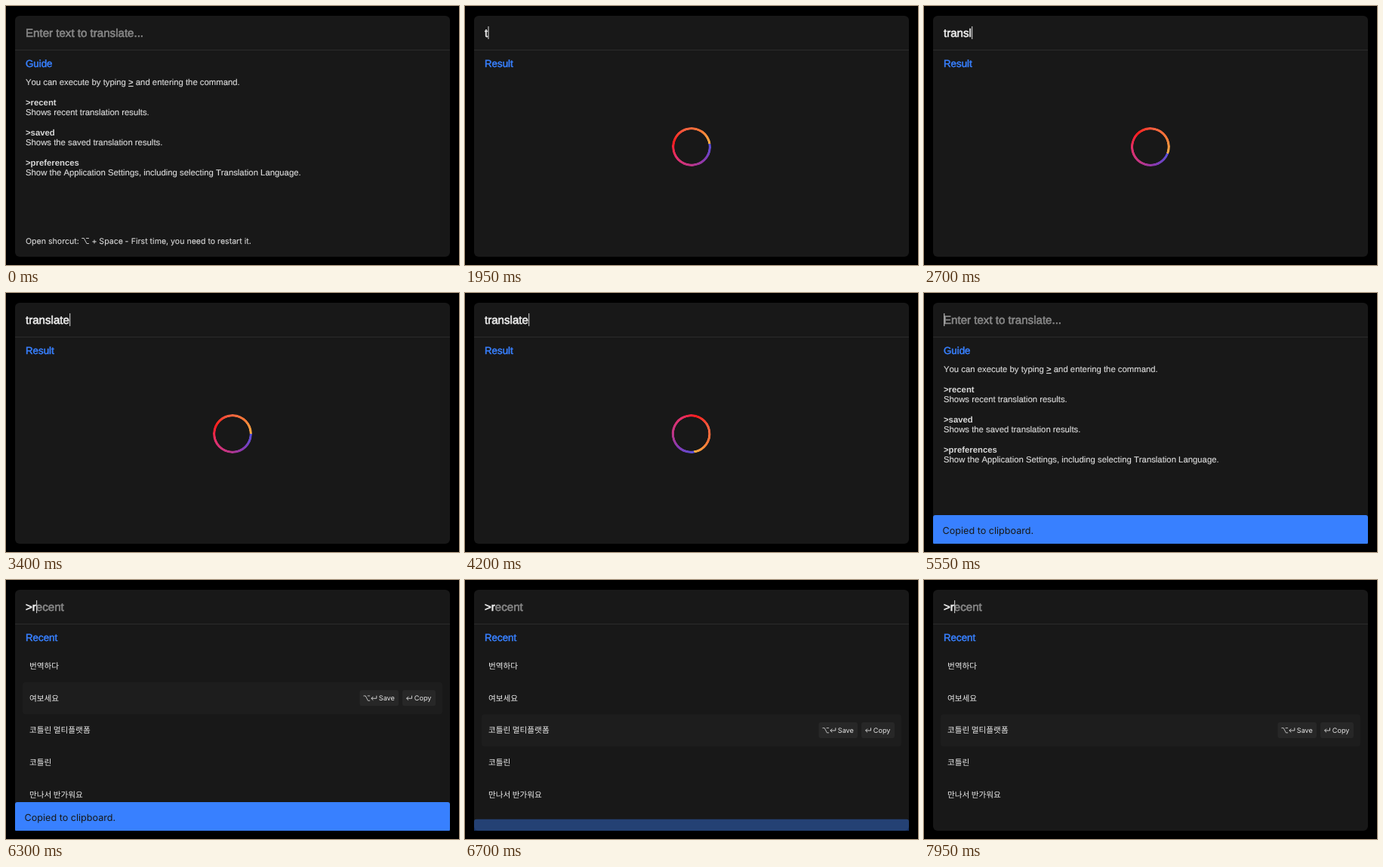
An HTML page that plays this animation: 600 px wide and 344 px high, repeating every 8000 ms.

```html
<!DOCTYPE html>
<html lang="en">
<head>
<meta charset="utf-8">
<title>Translator</title>
<style>
  html, body { margin: 0; width: 100%; height: 100%; overflow: hidden; background: #000; }
  svg { position: absolute; left: 0; top: 0; }
  text { white-space: pre; text-rendering: geometricPrecision; }
  .sans { font-family: "Liberation Sans", Arial, sans-serif; font-kerning: none; }
  .ui { font-family: Inter, sans-serif; }
  .field { font-size: 15.1px; stroke-width: .6px; }
  .typed { fill: #ececec; stroke: #ececec; }
  .ghost { fill: #878787; stroke: #878787; }
  .title { font-size: 13.3px; fill: #3880ff; stroke: #3880ff; stroke-width: .5px; }
  .body { font-size: 11.33px; fill: #d8d8d8; stroke: #d8d8d8; stroke-width: .15px; }
  .body .cmd { font-weight: bold; stroke-width: 0; }
  .footer { font-size: 10.58px; fill: #dadada; stroke: #dadada; stroke-width: .1px; }
  .item { font: 10.65px "Noto Sans CJK KR", "Noto Sans CJK", sans-serif; fill: #ededed; }
  .key { font-size: 9.1px; fill: #e4e4e4; }
  .glyph { fill: none; stroke: #dcdcdc; stroke-width: .9; }
  #spinner {
    position: absolute; left: 274.2px; top: 160.5px; width: 51.6px; height: 51.6px; border-radius: 50%;
    background: conic-gradient(from 90deg, #5851d8, #833ab4, #c13584, #e1306c, #fd1d1d, #f56040, #f77737, #fcaf45);
    -webkit-mask: radial-gradient(circle closest-side, transparent 22.4px, #000 23px);
    mask: radial-gradient(circle closest-side, transparent 22.4px, #000 23px);
  }
</style>
</head>
<body>
<svg width="600" height="344" viewBox="0 0 600 344">
  <defs>
    <clipPath id="panelClip"><rect x="12" y="13" width="576" height="320"/></clipPath>
    <path id="option" d="M0 .5H3L6.6 7.5H9.6M5.8 .5H9.6"/>
    <path id="enter" d="M7.5 0V3.6H.6M3 1.2L.6 3.6L3 6"/>
  </defs>
  <rect x="12" y="13" width="576" height="320" rx="6" fill="#181818"/>
  <rect x="12" y="58" width="576" height="1" fill="#2b2b2b"/>

  <text class="sans field" x="26" y="41.2"><tspan id="typed" class="typed"></tspan><tspan id="ghost" class="ghost"></tspan></text>
  <rect id="caret" y="27" width="1" height="17" fill="#dcdcdc"/>
  <text id="title" class="sans title" x="26" y="81.3"></text>

  <g id="guide">
    <g class="sans body">
      <text x="26" y="105">You can execute by typing <tspan class="cmd" text-decoration="underline">&gt;</tspan> and entering the command.</text>
      <text x="26" y="131.7" class="cmd">&gt;recent</text>
      <text x="26" y="145">Shows recent translation results.</text>
      <text x="26" y="171.7" class="cmd">&gt;saved</text>
      <text x="26" y="185">Shows the saved translation results.</text>
      <text x="26" y="211.7" class="cmd">&gt;preferences</text>
      <text x="26" y="225">Show the Application Settings, including selecting Translation Language.</text>
    </g>
    <g class="ui footer">
      <text x="26" y="316">Open shorcut:</text>
      <use href="#option" class="glyph" x="100.3" y="308"/>
      <text x="113.4" y="316">+ Space</text>
      <text x="157.6" y="316">-</text>
      <text x="165.8" y="316">First time, you need to restart it.</text>
    </g>
  </g>

  <g id="list">
    <g id="selection">
      <rect x="22" y="-21" width="556" height="42.5" rx="4" fill="#1d1d1d"/>
      <rect x="468.5" y="-10.5" width="51.5" height="21" rx="3" fill="#272727"/>
      <rect x="525" y="-10.5" width="44" height="21" rx="3" fill="#272727"/>
      <use href="#option" class="glyph" transform="translate(473.5 -3.4) scale(.9)"/>
      <use href="#enter" class="glyph" x="483.3" y="-3.2"/>
      <text class="ui key" x="493.8" y="3.4">Save</text>
      <use href="#enter" class="glyph" x="530" y="-3.2"/>
      <text class="ui key" x="540.8" y="3.4">Copy</text>
    </g>
    <g id="items" class="item"></g>
  </g>

  <g clip-path="url(#panelClip)">
    <g id="toast">
      <rect x="12" y="295" width="576" height="39" rx="3" fill="#3880ff"/>
      <text class="ui" x="24.6" y="319.8" font-size="12.6" fill="#181818">Copied to clipboard.</text>
    </g>
  </g>
</svg>
<div id="spinner"></div>

<script>
const LOOP = 8000;
const $ = id => document.getElementById(id);
const words = ['번역하다', '여보세요', '코틀린 멀티플랫폼', '코틀린', '만나서 반가워요'];
const rowY = i => 114.2 + i * 42.67;

const items = words.map((word, i) => {
  const text = document.createElementNS('http://www.w3.org/2000/svg', 'text');
  text.setAttribute('x', 31);
  text.setAttribute('y', rowY(i) + 3.9);
  text.textContent = word;
  return $('items').appendChild(text);
});

// Each track is a list of [start time, value].
const edits = [
  [-650, ''],
  ...[...'translate'].map((_, i) => [1840 + i * 164, 'translate'.slice(0, i + 1)]),
  [5050, ''], [5150, ''], [5640, '>'], [5830, '>r']
];
const pages = [[0, 'Guide'], [1840, 'Loading'], [4700, 'Result'], [5050, 'Guide'], [5840, 'Recent']];
const picks = [[0, 0], [6300, 1], [6450, 2], [7100, 1], [7300, 0], [7500, 1], [7650, 2]];
const at = (track, t) => track.findLast(step => step[0] <= t);

const show = (el, on) => { el.style.display = on ? '' : 'none'; };

// Critically damped spring from 0 to 1.
const spring = ms => ms <= 0 ? 0 : 1 - (1 + ms / 50) * Math.exp(-ms / 50);

function render(t) {
  const [editTime, value] = at(edits, t);
  const page = at(pages, t)[1];
  const isList = page === 'Result' || page === 'Recent';

  $('typed').textContent = value;
  $('ghost').textContent = value === '' ? 'Enter text to translate...' : value === '>r' ? 'ecent' : '';
  $('caret').setAttribute('x', 26.3 + (value ? $('typed').getComputedTextLength() : 0));
  show($('caret'), Math.floor((t - editTime) / 500) % 2 === 0);

  $('title').textContent = page === 'Loading' ? 'Result' : page;
  show($('guide'), page === 'Guide');
  show($('list'), isList);
  show($('spinner'), page === 'Loading');
  $('spinner').style.transform = `rotate(${(t - 3400) % 360}deg)`;

  items.forEach((item, i) => show(item, page === 'Recent' || i === 0));
  $('selection').setAttribute('transform', `translate(0 ${rowY(at(picks, t)[1])})`);

  const shown = spring(t - 5060) - spring(t - 6600);
  show($('toast'), shown > .004);
  $('toast').setAttribute('transform', `translate(0 ${(1 - shown) * 38})`);
  $('toast').setAttribute('opacity', shown);
}

function tick() {
  render(performance.now() % LOOP);
  requestAnimationFrame(tick);
}
tick();
</script>
</body>
</html>
```
